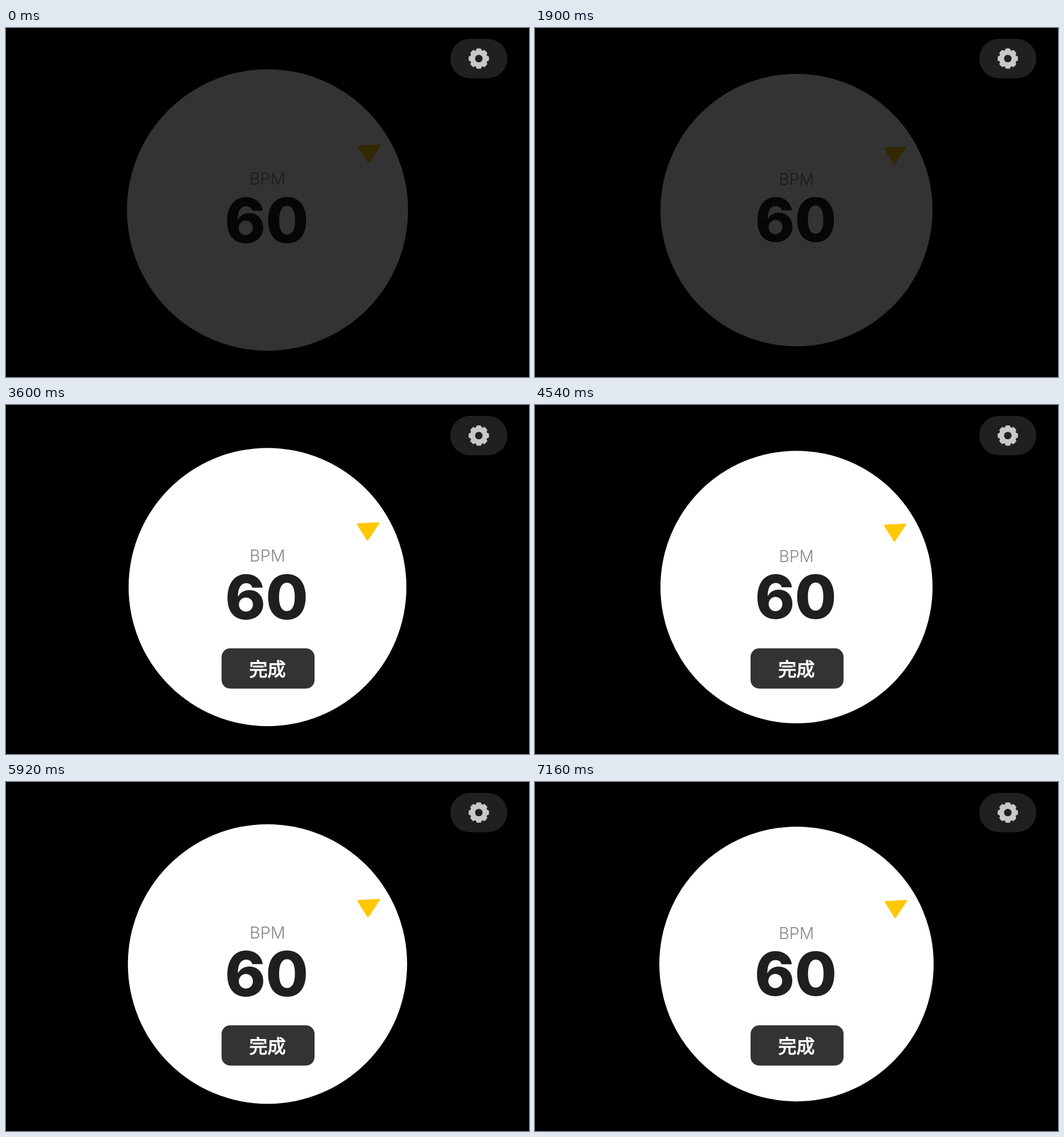
Write an HTML page that moves like this. It is 917 px wide and 611 px high and loops after 7.18 s.

```html
<!DOCTYPE html>
<html lang="zh-CN">
<head>
<meta charset="utf-8">
<style>
  html, body { margin: 0; width: 100%; height: 100%; overflow: hidden; background: #000; }
  svg { display: block; width: 917px; height: 611px; }
  text { text-anchor: middle; font-family: Inter, Roboto, sans-serif; }
  .cjk { font-family: "Noto Sans CJK SC", "Noto Sans CJK", sans-serif; fill: #fff; stroke: #fff; stroke-width: 1.2; }
</style>
</head>
<body>
<svg viewBox="0 0 917 611">
  <rect width="917" height="611"/>
  <g id="dial">
    <circle cx="458.5" cy="318.7" r="246.4" fill="#fff"/>
    <path d="M618.6 207.4L655.6 205.3L635.8 235Z" fill="#ffc800" stroke="#ffc800" stroke-width="3" stroke-linejoin="round"/>
    <text x="458.3" y="273.5" font-size="29" font-weight="300" fill="#868686">BPM</text>
    <text x="457" y="375.5" font-size="109" font-weight="800" fill="#1f1f21">60</text>
  </g>
  <g id="done">
    <rect x="378" y="426" width="163" height="70.5" rx="15" fill="#333"/>
    <text class="cjk" x="458.5" y="474" font-size="32">完成</text>
  </g>
  <g id="hint" class="cjk" font-size="48.5">
    <text x="458" y="309.5">点击开启</text>
    <text x="458.5" y="367">节拍器</text>
  </g>
  <rect x="779" y="19" width="100" height="69" rx="34.5" fill="#202022"/>
  <g id="gear" transform="translate(829 53.5)" fill="#c8c8ca">
    <circle r="15.3"/>
    <circle r="6.6" fill="#202022"/>
  </g>
</svg>
<script>
const LOOP = 7180;
const [dial, done, hint, gear] = ['dial', 'done', 'hint', 'gear'].map(id => document.getElementById(id));

// gear teeth
for (let i = 0; i < 8; i++) {
  const tooth = document.createElementNS('http://www.w3.org/2000/svg', 'rect');
  const attrs = { x: -4.6, y: -17.8, width: 9.2, height: 8, rx: 2.5, transform: `rotate(${i * 45})` };
  for (const key in attrs) tooth.setAttribute(key, attrs[key]);
  gear.append(tooth);
}

// cubic-bezier(.25, .1, .25, 1)
function ease(x) {
  if (x <= 0) return 0;
  if (x >= 1) return 1;
  const bezier = (a, b, u) => 3 * a * u * (1 - u) ** 2 + 3 * b * u * u * (1 - u) + u ** 3;
  let lo = 0, hi = 1;
  for (let i = 0; i < 24; i++) {
    const mid = (lo + hi) / 2;
    if (bezier(.25, .25, mid) < x) lo = mid; else hi = mid;
  }
  return bezier(.1, 1, lo);
}

function draw() {
  const t = performance.now() % LOOP;
  const ramp = (start, length) => ease((t - start) / length);

  // press once, then breathe in and out
  const shrink = ramp(905, 1000) - ramp(2125, 1200) + ramp(3325, 1200)
    - ramp(4530, 1200) + ramp(5730, 1200) - ramp(6945, 1200);
  const lit = ramp(2140, 1000);

  dial.setAttribute('transform',
    `translate(458.5 318.7) scale(${1 - .032 * shrink}) translate(-458.5 -318.7)`);
  dial.setAttribute('opacity', .2 + .8 * lit);
  done.setAttribute('opacity', lit);
  hint.setAttribute('opacity', ramp(285, 400) - ramp(1620, 300));
  requestAnimationFrame(draw);
}
draw();
</script>
</body>
</html>
```
